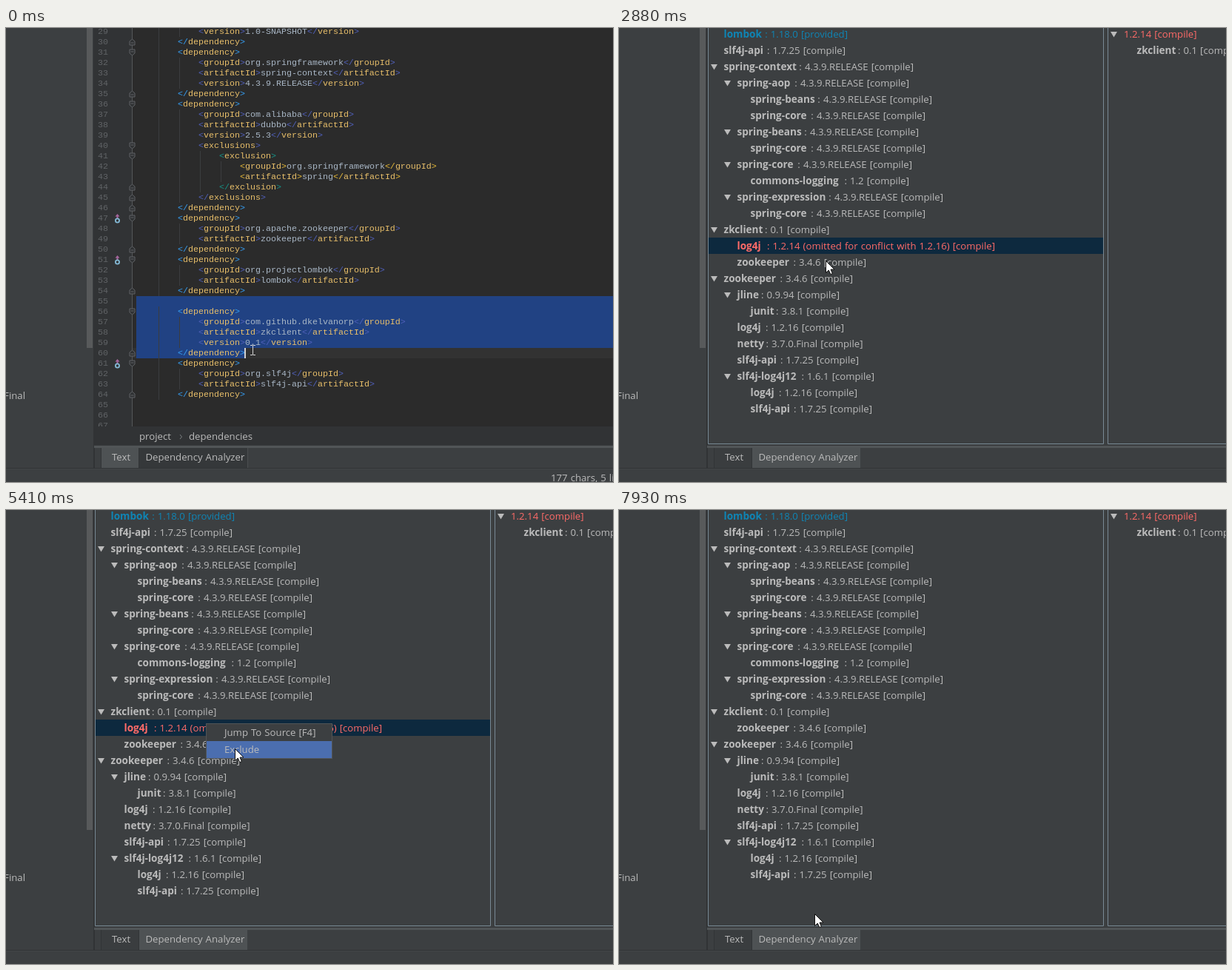
These frames come from a looping animation (820x613 px, 8 s). An HTML page:

```html
<!DOCTYPE html>
<html lang="en">
<head>
<meta charset="utf-8">
<title>Dependency Analyzer</title>
<style>
  html, body { margin: 0; width: 100%; height: 100%; overflow: hidden; background: #3c3f41; }
  svg { display: block; width: 820px; height: 613px; }
  text { font: 13.2px "Open Sans", "Noto Sans", sans-serif; word-spacing: 0.6px; fill: #bbb; white-space: pre; }
  .bold { font-weight: 700; font-size: 13.6px; }
  .code { font: 11.66px "Liberation Mono", monospace; word-spacing: 0; fill: #a9b7c6; }
  .num { fill: #606366; }
  .red { fill: #ff6b68; }
  .blue { fill: #0f85b5; }
</style>
</head>
<body>
<svg id="stage" viewBox="0 0 820 613"></svg>
<script>
const LOOP = 8000;
const SVG = 'http://www.w3.org/2000/svg';
const stage = document.getElementById('stage');

function add(parent, tag, attrs = {}, content) {
  const el = document.createElementNS(SVG, tag);
  for (const key in attrs) el.setAttribute(key, attrs[key]);
  if (content !== undefined) el.textContent = content;
  return parent.appendChild(el);
}
const group = (parent = stage) => add(parent, 'g');
const rect = (parent, x, y, width, height, fill) => add(parent, 'rect', { x, y, width, height, fill });
const path = (parent, d, fill = 'none', stroke = 'none') => add(parent, 'path', { d, fill, stroke });
const label = (parent, x, y, content, cls = '') => add(parent, 'text', { x, y, class: cls }, content);
const labelEnd = (parent, x, y, content, cls = '') =>
  add(parent, 'text', { x, y, class: cls, 'text-anchor': 'end' }, content);
const show = (el, on) => { el.style.display = on ? '' : 'none'; };

// Window frame shared by both views
function buildFrame() {
  const g = group();
  rect(g, 0, 0, 820, 613, '#3c3f41');
  rect(g, 109, 0, 8, 432, '#585a5b');
  rect(g, 118, 0, 2, 594, '#313335');
  labelEnd(g, 26, 501, 'Final');
  rect(g, 119, 563, 701, 1, '#37393b');
  rect(g, 119, 564, 701, 3, '#515557');
  rect(g, 0, 594, 820, 1, '#313335');
  rect(g, 0, 595, 820, 1, '#434648');
}

function buildTabs(parent, textActive) {
  rect(parent, 128, 567, 52, 27, textActive ? '#4e5254' : '#3a3d3f');
  rect(parent, 180, 567, 146, 27, textActive ? '#35383a' : '#4e5254');
  rect(parent, 128, 567, 1, 27, '#323537');
  rect(parent, 179, 567, 1, 27, '#323537');
  rect(parent, 326, 567, 1, 27, textActive ? '#4b4e50' : '#3c3f41');
  label(parent, 143, 584, 'Text');
  label(parent, 188.5, 584, 'Dependency Analyzer');
}

const pom = `            <version>1.0-SNAPSHOT</version>
        </dependency>
        <dependency>
            <groupId>org.springframework</groupId>
            <artifactId>spring-context</artifactId>
            <version>4.3.9.RELEASE</version>
        </dependency>
        <dependency>
            <groupId>com.alibaba</groupId>
            <artifactId>dubbo</artifactId>
            <version>2.5.3</version>
            <exclusions>
                <exclusion>
                    <groupId>org.springframework</groupId>
                    <artifactId>spring</artifactId>
                </exclusion>
            </exclusions>
        </dependency>
        <dependency>
            <groupId>org.apache.zookeeper</groupId>
            <artifactId>zookeeper</artifactId>
        </dependency>
        <dependency>
            <groupId>org.projectlombok</groupId>
            <artifactId>lombok</artifactId>
        </dependency>

        <dependency>
            <groupId>com.github.dkelvanorp</groupId>
            <artifactId>zkclient</artifactId>
            <version>0.1</version>
        </dependency>
        <dependency>
            <groupId>org.slf4j</groupId>
            <artifactId>slf4j-api</artifactId>
        </dependency>


`.split('\n');
const FIRST_LINE = 29;
const BRACKETS = ['#e8ba36', '#54a857', '#359ff4', '#5060bb', '#179387'];
const lineTop = n => 362 + 14 * (n - 55);

function buildCodeLine(g, source, n) {
  const top = lineTop(n);
  const indent = source.search(/\S/);
  label(g, 124, top + 10, n, 'code num');
  if (indent < 0) return;
  for (let col = 4; col < indent; col += 4) rect(g, 178 + col * 7, top, 1, 14, '#3b3d3f');

  const bracket = BRACKETS[indent / 4 % 5];
  const line = label(g, 176 + indent * 7, top + 10, '', 'code');
  for (const token of source.trim().match(/<\/?|>|[^<>]+/g)) {
    const span = add(line, 'tspan', {}, token);
    if (/[<>]/.test(token)) span.style.fill = bracket;
    else if (new RegExp(`</?${token}>`).test(source)) span.style.fill = '#e8bf6a';
  }

  // Fold marks for elements that span lines
  const tags = source.match(/</g).length;
  if (tags === 1) {
    const flip = source.includes('</') ? -1 : 1;
    const mark = path(g, 'M-3.5-4h7v5l-3.5 3l-3.5-3zM-2-1h4', '#2f3133', '#606366');
    mark.setAttribute('transform', `translate(170.5 ${top + 7}) scale(1 ${flip})`);
  }
}

function buildEditor() {
  const g = group();
  rect(g, 119, 0, 52, 538, '#313335');
  rect(g, 171, 0, 649, 538, '#2b2b2b');
  rect(g, 171, 432, 649, 14, '#323232');
  rect(g, 176, 362, 644, 70, '#214283');
  rect(g, 176, 432, 147, 14, '#214283');
  rect(g, 170, 0, 1, 538, '#555759');
  pom.forEach((source, i) => buildCodeLine(g, source, FIRST_LINE + i));

  for (const n of [47, 51, 61]) {
    const y = lineTop(n) + 7;
    path(g, `M150.5 ${y - 6}l3 3.5h-2v3h-2v-3h-2z`, '#a5659c');
    add(g, 'circle', { cx: 150.5, cy: y + 3, r: 2.6, fill: '#313335', stroke: '#83b8d4', 'stroke-width': 1.8 });
  }

  rect(g, 119, 538, 701, 25, '#313335');
  label(g, 180, 556, 'project');
  path(g, 'M235 549l2.5 3l-2.5 3', 'none', '#7d8083');
  label(g, 247, 556, 'dependencies');
  buildTabs(g, true);
  label(g, 736, 612, '177 chars, 5 line breaks');
  return g;
}

// [depth, name, right edge, details, expanded, class]
const C = '[compile]', REL = '4.3.9.RELEASE ' + C;
const tree = [
  [0, 'lombok', 308, '1.18.0 [provided]', 0, 'blue'],
  [0, 'slf4j-api', 305, '1.7.25 ' + C],
  [0, 'spring-context', 397, REL, 1],
  [1, 'spring-aop', 391, REL, 1],
  [2, 'spring-beans', 422, REL],
  [2, 'spring-core', 413, REL],
  [1, 'spring-beans', 404, REL, 1],
  [2, 'spring-core', 413, REL],
  [1, 'spring-core', 395, REL, 1],
  [2, 'commons-logging', 391, '1.2 ' + C],
  [1, 'spring-expression', 437, REL, 1],
  [2, 'spring-core', 413, REL],
  [0, 'zkclient', 283, '0.1 ' + C, 1],
  [1, 'log4j', 507, '1.2.14 (omitted for conflict with 1.2.16) ' + C, 0, 'red'],
  [1, 'zookeeper', 333, '3.4.6 ' + C],
  [0, 'zookeeper', 315, '3.4.6 ' + C, 1],
  [1, 'jline', 297, '0.9.94 ' + C, 1],
  [2, 'junit', 308, '3.8.1 ' + C],
  [1, 'log4j', 303, '1.2.16 ' + C],
  [1, 'netty', 325, '3.7.0.Final ' + C],
  [1, 'slf4j-api', 323, '1.7.25 ' + C],
  [1, 'slf4j-log4j12', 344, '1.6.1 ' + C, 1],
  [2, 'log4j', 321, '1.2.16 ' + C],
  [2, 'slf4j-api', 341, '1.7.25 ' + C]
];
const CONFLICT = 13, ROW = 22, MIN_GAP = 2.5;

const arrowDown = (g, x, y) => path(g, `M${x - 4.5} ${y - 3}h9l-4.5 7.5z`, '#bbb');

// Bold name on the left, details up to the right edge, never touching
function buildEntry(g, x, right, y, name, details, cls = '') {
  const title = label(g, x, y + 5, name, 'bold ' + cls);
  const info = label(g, x, y + 5, ': ' + details, cls);
  const nameEnd = x + title.getComputedTextLength();
  info.setAttribute('x', Math.max(right + 1 - info.getComputedTextLength(), nameEnd + MIN_GAP));
  return [title, info];
}

function buildTree() {
  const root = group();
  path(root, 'M120.5-1V561.5H654.5V-1M660.5-1V561.5H821', 'none', '#788994');
  const upper = group(root), conflict = group(root), lower = group(root);
  const bar = rect(conflict, 121, 283, 533, ROW, '#0d293e');
  let rowText;
  tree.forEach(([depth, name, right, details, open, cls], i) => {
    const g = i < CONFLICT ? upper : i > CONFLICT ? lower : conflict;
    const x = 142 + depth * 18, y = 8 + i * ROW;
    if (open) arrowDown(g, x - 13.5, y);
    const parts = buildEntry(g, x - 0.5, right, y, name, details, cls);
    if (i === CONFLICT) rowText = parts;
  });

  arrowDown(root, 668.5, 8);
  label(root, 682, 13, '1.2.14 ' + C, 'red');
  buildEntry(root, 699.5, 841, 30, 'zkclient', '0.1 ' + C);
  buildTabs(root, false);
  return { root, conflict, lower, bar, rowText };
}

function buildMenu() {
  const root = group();
  rect(root, 270, 288, 171, 48, '#515456');
  rect(root, 271, 289, 169, 46, '#3c3f41');
  const hover = rect(root, 271, 312, 169, 23, '#4b6eaf');
  label(root, 295, 305, 'Jump To Source [F4]');
  label(root, 295, 328, 'Exclude');
  return { root, hover };
}

buildFrame();
const editor = buildEditor();
const caret = rect(editor, 322, 432, 2, 14, '#d0d0d0');
const bulb = group(editor);
add(bulb, 'circle', { cx: 190, cy: 434.5, r: 5.3, fill: '#f2bf57' });
rect(bulb, 187.5, 439, 5, 2, '#f2bf57');
rect(bulb, 187.5, 441, 5, 2.5, '#a9abad');
const view = buildTree();
const menu = buildMenu();
const beam = path(stage, 'M-3.5-6.5h3l.5.5l.5-.5h3M0-6V6M-3.5 6.5h3l.5-.5l.5.5h3', 'none', '#d4d4d4');
const arrow = path(stage, 'M.5.5V16.5L4.3 13L6.8 18.6L9.4 17.5L7 12H12Z', '#fff', '#111');

// Pointer moves: [start, end, steps, x, y]
const START = [333, 435];
const moves = [
  [120, 240, 2, 369, 436],
  [550, 1410, 7, 248, 580],
  [2220, 3000, 7, 281, 298],
  [3430, 3710, 3, 205, 270],
  [3850, 4390, 5, 270, 288],
  [5100, 5410, 3, 309, 322],
  [6480, 6940, 4, 293, 474],
  [7360, 7930, 5, 264, 545]
];
const ease = f => f * f * (3 - 2 * f);

function pointerAt(t) {
  let [x, y] = START;
  for (const [t0, t1, steps, toX, toY] of moves) {
    if (t < t0) break;
    const done = Math.min(steps, Math.floor((t - t0) * (steps - 1) / (t1 - t0) + 1.001));
    const f = ease(done / steps);
    x += (toX - x) * f;
    y += (toY - y) * f;
  }
  return [Math.round(x), Math.round(y)];
}

const within = (t, from, to) => t >= from && t < to;

function render(t) {
  const editing = t < 1950;
  show(editor, editing);
  show(view.root, !editing);
  show(caret, t < 550 || within(t, 980, 1410));
  show(bulb, t >= 840);

  const menuOpen = within(t, 4670, 5810);
  const focused = t >= 3000 && !menuOpen;
  const excluded = t >= 5930;
  view.bar.setAttribute('fill', focused ? '#4b6eaf' : '#0d293e');
  for (const el of view.rowText) el.classList.toggle('red', !focused);
  show(view.conflict, !excluded);
  view.lower.setAttribute('transform', `translate(0 ${excluded ? -ROW : 0})`);

  const [x, y] = pointerAt(t);
  show(menu.root, menuOpen);
  show(menu.hover, x > 270 && y > 288);
  menu.hover.setAttribute('y', y < 312 ? 289 : 312);

  const overText = editing && y < 538;
  show(beam, overText);
  show(arrow, !overText);
  beam.setAttribute('transform', `translate(${x + 0.5} ${y})`);
  arrow.setAttribute('transform', `translate(${x} ${y})`);
}

const begin = performance.now();
function tick() {
  render((performance.now() - begin) % LOOP);
  requestAnimationFrame(tick);
}
tick();
</script>
</body>
</html>
```
